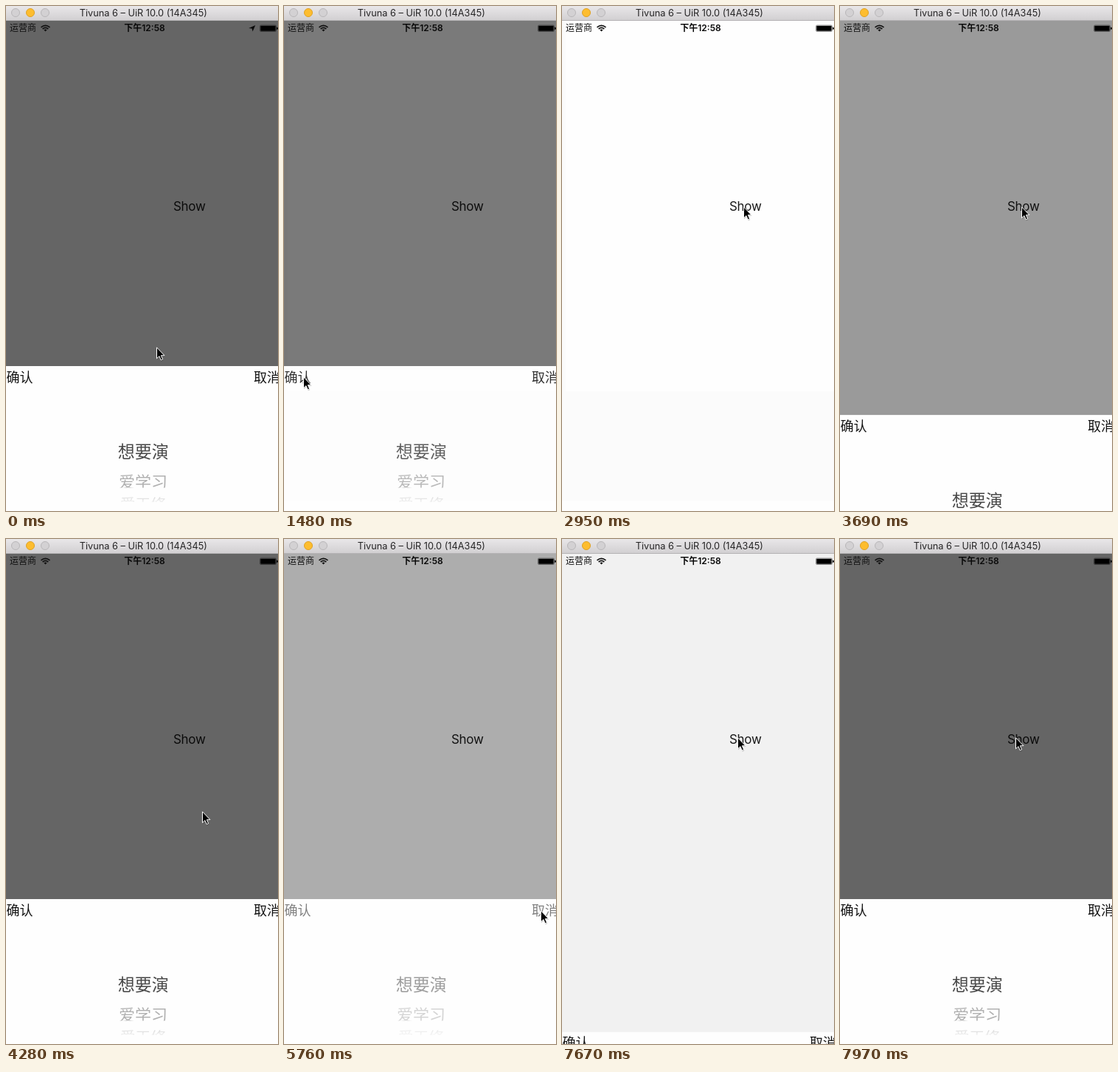
Write an HTML page that moves like this. It is 369 by 683 pixels and loops after 8000 ms.

```html
<!DOCTYPE html>
<html lang="zh-CN">
<head>
<meta charset="utf-8">
<title>Picker demo</title>
<style>
html, body { margin: 0; width: 100%; height: 100%; overflow: hidden; background: #fefefe; }
svg { display: block; width: 100vw; height: 100vh; }
text { font-family: Inter, "Noto Sans CJK SC", "Noto Sans CJK", sans-serif; white-space: pre; }
.cjk { font-family: "Noto Sans CJK SC", "Noto Sans CJK", sans-serif; }
.mid { text-anchor: middle; }
</style>
</head>
<body>
<svg viewBox="0 0 369 683">
  <defs>
    <linearGradient id="bar" x2="0" y2="1">
      <stop stop-color="#e9e7e9"/><stop offset="1" stop-color="#d1cfd1"/>
    </linearGradient>
    <linearGradient id="dim" x2="0" y2="1">
      <stop stop-color="#c8c8c8"/><stop offset=".5" stop-color="#f2f2f2"/>
    </linearGradient>
    <clipPath id="row2"><rect x="140" y="625" width="90" height="26.5"/></clipPath>
    <clipPath id="row3"><rect x="140" y="660" width="90" height="11"/></clipPath>
  </defs>

  <rect width="369" height="683" fill="#fefefe"/>
  <path id="ghost" d="M0 20H5V521H369V669H0Z" fill="#fbfbfb"/>
  <text x="227" y="276.5" font-size="17" letter-spacing="-.3" fill="#1c1c1c">Show</text>

  <g id="picker">
    <rect id="shade" y="19" width="369" height="664"/>
    <g id="panel" class="cjk">
      <rect y="487" width="369" height="200" fill="#fefefe"/>
      <g font-size="18" fill="#141414">
        <text class="cjk" x=".5" y="508.6">确认</text>
        <text class="cjk" x="336" y="508.6">取消</text>
      </g>
      <text class="cjk mid" x="186.3" y="610.5" font-size="23" fill="#484848">想要演</text>
      <g clip-path="url(#row2)">
        <text class="cjk mid" transform="translate(186 650.6) scale(1 .95)" font-size="22" fill="#b0b0b0">爱学习</text>
      </g>
      <g clip-path="url(#row3)">
        <text class="cjk mid" transform="translate(186 678.5) scale(1 .8)" font-size="20.8" fill="url(#dim)">爱天修</text>
      </g>
    </g>
  </g>

  <text class="cjk" x="5" y="34.3" font-size="12" fill="#111">运营商</text>
  <path d="M47.5 28.8Q53.5 23.8 59.5 28.8M49.7 31Q53.5 27.8 57.3 31" fill="none" stroke="#111" stroke-width="1.7"/>
  <path d="M51.4 32.2Q53.5 30.6 55.6 32.2L53.5 34.4Z" fill="#111"/>
  <text class="mid" x="188" y="34.4" font-size="12" font-weight="600" fill="#0a0a0a">下午12:58</text>
  <path id="locate" d="M338.3 26L334.6 34.4 333.6 30.6 329.3 30Z" fill="#0a0a0a"/>
  <rect x="344.5" y="26" width="22" height="8.5" rx="1.5" fill="none" stroke="#000" stroke-opacity=".5" stroke-width=".8"/>
  <rect x="345.3" y="26.8" width="20.4" height="7" rx=".8"/>
  <path d="M367.2 28.6Q369 28.8 369 30.3T367.2 32Z"/>

  <rect width="369" height="19.5" fill="url(#bar)"/>
  <rect y="19" width="369" height="1" fill="#b4b2b4"/>
  <g stroke="#b9b7b9" fill="#d3d1d3">
    <circle cx="13" cy="9" r="5.5"/>
    <circle cx="33" cy="9" r="5.5" fill="#fdbd2f" stroke="#dfa124"/>
    <circle cx="53" cy="9" r="5.5"/>
  </g>
  <text class="mid" x="186.3" y="14" font-size="12.75" fill="#262526">Tivuna 6 – UiR 10.0 (14A345)</text>

  <g id="cursor">
    <path d="M.5 1.2V16.2L4 13 6.3 18.4 8.9 17.3 6.6 12.1H11.3Z" transform="translate(.5 1)" opacity=".2"/>
    <path d="M.5 .8V15.8L4 12.6 6.2 17.8 8.6 16.8 6.4 11.7H11Z" stroke="#fff"/>
  </g>
</svg>
<script>
const LOOP = 8000, STEP = 147.5;
const [ghost, picker, shade, panel, locate, cursor] =
  ['ghost', 'picker', 'shade', 'panel', 'locate', 'cursor'].map(id => document.getElementById(id));

// Pointer sweeps: start and end in steps, bend point, target.
const HOME = [204, 461];
const sweeps = [
  { from: 0, to: 8, bend: [60, 515], end: [26, 501] },
  { from: 10.5, to: 19, bend: [222, 410], end: [246, 271] },
  { from: 25.5, to: 33.5, bend: [253, 393], end: [348, 502] },
  { from: 39.5, to: 46.3, bend: [270, 330], end: [238, 268] }
];
const shows = [-LOOP, 3480, 7610], hides = [1385, 5560];

function ease(t, start, len) {
  const p = Math.min(1, Math.max(0, (t - start) / len));
  return p * p * (3 - 2 * p);
}

function pointer(k) {
  let at = HOME;
  for (const { from, to, bend, end } of sweeps) {
    const u = ease(k, from, to - from), v = 1 - u;
    at = at.map((a, i) => v * v * a + 2 * u * v * bend[i] + u * u * end[i]);
  }
  return at.map(Math.round);
}

function draw(ms) {
  const k = Math.floor((ms + 6) / STEP), t = k * STEP;
  const shown = shows.findLast(s => s <= t);
  const hidden = hides.find(h => h > shown) ?? Infinity;
  const rise = ease(t, shown, 340), fade = 1 - ease(t, hidden, 400);

  picker.setAttribute('opacity', fade);
  shade.setAttribute('opacity', 0.6 * rise);
  panel.setAttribute('transform', `translate(0 ${196 * (1 - rise)})`);
  ghost.setAttribute('visibility', t > hides[0] && t < shows[1] ? 'visible' : 'hidden');
  locate.setAttribute('visibility', k < 9 ? 'visible' : 'hidden');
  cursor.setAttribute('transform', `translate(${pointer(k)})`);
}

const begin = performance.now();
function tick() {
  draw((performance.now() - begin) % LOOP);
  requestAnimationFrame(tick);
}
tick();
</script>
</body>
</html>
```
